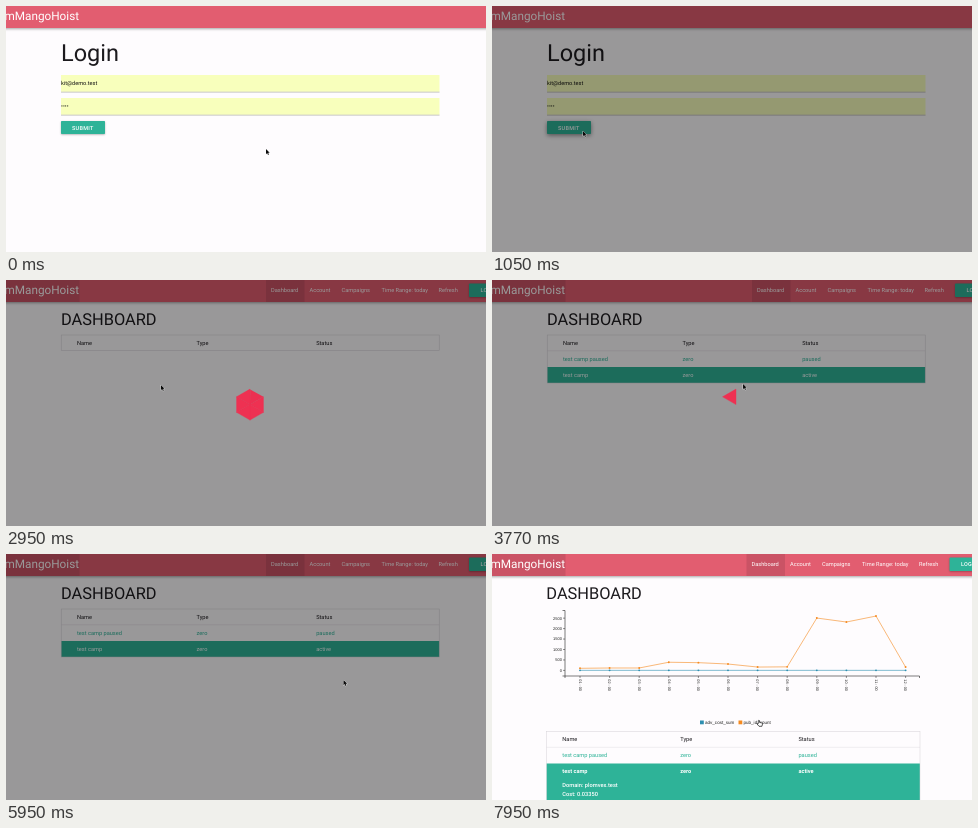
An HTML page with a canvas that plays this animation: 480x246 px, repeating every 8000 ms.

```html
<!DOCTYPE html>
<html lang="en">
<head>
<meta charset="utf-8">
<title>Dashboard login</title>
<style>
  html, body { margin: 0; width: 100%; height: 100%; overflow: hidden; background: #fefcfe; }
  canvas { display: block; width: 480px; height: 246px; }
</style>
</head>
<body>
<canvas id="stage"></canvas>
<script>
const W = 480, H = 246, LOOP = 8000;
const canvas = document.getElementById('stage');
const ctx = canvas.getContext('2d');
const dpr = window.devicePixelRatio || 1;
canvas.width = W * dpr;
canvas.height = H * dpr;

const SANS = 'Roboto, sans-serif';
const ARIAL = '"Liberation Sans", sans-serif';
const INK = '#1c1a1e', GREEN = '#2eb398', PINK = '#e25d70', PINK_ACTIVE = '#ca5365';
const BLUE = '#2e8fb0', ORANGE = '#f58a1f';

// Times of the hard changes and of the loader, in ms
const DIM = 900, ROUTE = 1500, SPIN = 1947, ROWS = 3600, SPIN_END = 5940, CHART = 6150;

// Pointer stops: time, x, y
const PATH = [
  [0, 260, 143], [100, 259, 143], [780, 91, 125], [1200, 91, 125],
  [2300, 154, 105], [3100, 155, 105], [4200, 300, 103.5], [4800, 301.5, 103.5],
  [5600, 337.5, 126], [5980, 337.5, 126], [6280, 330, 258], [6700, 320, 258],
  [7600, 265.5, 166], [8000, 265.5, 166]
];

function text(str, x, y, size, color = INK, weight = 400, family = SANS, align = 'left') {
  ctx.font = `${weight} ${size}px ${family}`;
  ctx.fillStyle = color;
  ctx.textAlign = align;
  ctx.fillText(str, x, y);
}

function box(x, y, w, h, color) {
  ctx.fillStyle = color;
  ctx.fillRect(x, y, w, h);
}

function line(points, color, width) {
  ctx.beginPath();
  points.forEach(([x, y]) => ctx.lineTo(x, y));
  ctx.strokeStyle = color;
  ctx.lineWidth = width;
  ctx.stroke();
}

function shadow(blur, y, alpha) {
  ctx.shadowBlur = blur * dpr;
  ctx.shadowOffsetY = y * dpr;
  ctx.shadowColor = `rgba(0,0,0,${alpha})`;
}

function button(label, x, y, w, h, textX, raised) {
  ctx.save();
  shadow(raised ? 4 : 2, raised ? 1.4 : 0.7, raised ? 0.45 : 0.3);
  ctx.fillStyle = GREEN;
  ctx.beginPath();
  ctx.roundRect(x, y, w, h, 0.8);
  ctx.fill();
  ctx.restore();
  ctx.letterSpacing = '0.25px';
  text(label, textX, y + h / 2 + 2, 5.5, '#fff', 500);
  ctx.letterSpacing = '0px';
}

function nav(signedIn, dx) {
  ctx.save();
  shadow(2.5, 0.8, 0.35);
  box(-5, -5, W + 10, 27, PINK);
  ctx.restore();
  if (signedIn) {
    box(0, 0, 73.5, 22, PINK_ACTIVE);
    box(260 + dx, 0, 38.5, 22, PINK_ACTIVE);
    const links = [['Dashboard', 265], ['Account', 303.5], ['Campaigns', 335.5],
      ['Time Range: today', 375.5], ['Refresh', 432.5]];
    links.forEach(([label, x]) => text(label, x + dx, 12, 5.65, '#fff'));
    button('LOGOUT', 463 + dx, 3.5, 46, 13.5, 474.5 + dx, false);
  }
  text('mMangoHoist', -1.5, 14, 11.75, '#fff');
}

function field(value, y) {
  box(55, y, 378.5, 16.8, '#f8ffbc');
  box(55, y + 16.8, 378.5, 0.6, '#a5a5a0');
  text(value, 55, y + 10.4, 5.6, '#111');
}

function login(t) {
  nav(false, 0);
  text('Login', 55, 55, 23.5);
  field('kit@demo.test', 69);
  field('••••', 92);
  button('SUBMIT', 55, 115, 44, 13, 66, t > 740);
}

function table(x, y, w, rows, details) {
  const cols = [15.8, 0.358 * w, 0.6745 * w];
  const row = (cells, base, color, weight) =>
    cells.forEach((cell, i) => text(cell, x + cols[i], base, 5.65, color, weight));
  const bottom = y + (rows ? 48 : 15.5);
  row(['Name', 'Type', 'Status'], y + 9.7);
  if (rows) {
    row(['test camp paused', 'zero', 'paused'], y + 25.8, GREEN);
    box(x, y + 32, w, details ? 60 : 16, GREEN);
    row(['test camp', 'zero', 'active'], y + 41.9, '#fff', details ? 700 : 400);
    line([[x, y + 15.8], [x + w, y + 15.8]], '#dedbe0', 0.5);
  }
  ctx.strokeStyle = '#d5d2d7';
  ctx.lineWidth = 0.5;
  ctx.strokeRect(x, y, w, details ? 100 : bottom - y);
  if (details) {
    ['Domain: plomvex.test', 'Cost: 0.03350', 'All hits: 120'].forEach((s, i) =>
      text(s, x + 15.8, y + 55.8 + i * 8.2, 5.7, '#fff', 500));
  }
}

function chart() {
  const px = i => 88 + i * 29.6;
  const py = v => 116.4 - v * 0.0209;
  line([[70.5, 56.5], [73, 56.5], [73, 122], [70.5, 122]], '#222', 0.6);
  line([[73, 124], [73, 122], [427.5, 122], [427.5, 124]], '#222', 0.6);
  for (let v = 0; v <= 2500; v += 500) {
    line([[71, py(v)], [73, py(v)]], '#222', 0.5);
    text(v, 70, py(v) + 1.4, 4, '#222', 400, ARIAL, 'right');
  }
  const hits = [100, 115, 115, 390, 370, 305, 160, 170, 2505, 2315, 2600, 160];
  const series = [[hits.map(() => 2), BLUE], [hits, ORANGE]];
  series.forEach(([values, color]) => {
    const pts = values.map((v, i) => [px(i), py(v)]);
    line(pts, color, 0.6);
    ctx.fillStyle = color;
    pts.forEach(([x, y]) => {
      ctx.beginPath();
      ctx.arc(x, y, 0.95, 0, 7);
      ctx.fill();
    });
  });
  for (let i = 0; i < 12; i++) {
    line([[px(i), 122], [px(i), 124]], '#222', 0.5);
    ctx.save();
    ctx.translate(px(i) - 1.2, 125.3);
    ctx.rotate(Math.PI / 2);
    text(`${String(i + 1).padStart(2, '0')} : 00`, 0, 0, 3.8, '#222', 400, ARIAL);
    ctx.restore();
  }
  [['adv_cost_sum', 208, BLUE], ['pub_id_count', 246.5, ORANGE]].forEach(([s, x, color]) => {
    box(x, 166.5, 3.8, 3.8, color);
    text(s, x + 5, 170, 4.55, '#222', 400, ARIAL);
  });
}

function dashboard(t) {
  const full = t >= CHART;
  nav(true, full ? -5.5 : 0);
  text('DASHBOARD', full ? 54.3 : 55, 45, 16.4);
  if (full) {
    chart();
    table(54.5, 177.5, 373.5, true, true);
  } else {
    table(55.2, 55, 378, t >= ROWS, false);
  }
}

// Six triangles unfold clockwise, then fold away in the same order
function loader(t) {
  const cx = 244, cy = 124.6, r = 15.5;
  const phase = (t - SPIN) % 2000 / 1000;
  const filling = phase < 1;
  const corner = k => {
    const a = (k * 60 - 90) * Math.PI / 180;
    return [r * Math.cos(a), r * Math.sin(a)];
  };
  for (let k = 0; k < 6; k++) {
    const p = Math.min(1, Math.max(0, phase % 1 * 6 - k));
    const open = filling ? p : 1 - p;
    if (open < 0.06) continue;
    const hinge = corner(filling ? k : k + 1);
    const tip = corner(filling ? k + 1 : k);
    const move = i => hinge[i] / 2 + (tip[i] - hinge[i] / 2) * open;
    ctx.beginPath();
    ctx.moveTo(cx, cy);
    ctx.lineTo(cx + hinge[0], cy + hinge[1]);
    ctx.lineTo(cx + move(0), cy + move(1));
    ctx.closePath();
    const shade = 0.45 + 0.55 * open;
    ctx.fillStyle = `rgb(${238 * shade},${49 * shade},${82 * shade})`;
    ctx.fill();
    if (open === 1) {
      ctx.strokeStyle = ctx.fillStyle;
      ctx.lineWidth = 0.4;
      ctx.stroke();
    }
  }
}

function pointerAt(t) {
  const i = Math.max(1, PATH.findIndex(p => p[0] > t));
  const [t0, x0, y0] = PATH[i - 1], [t1, x1, y1] = PATH[i];
  const u = (t - t0) / (t1 - t0);
  const e = u * u * (3 - 2 * u);
  return [x0 + (x1 - x0) * e, y0 + (y1 - y0) * e];
}

const ARROW = new Path2D('M0 0V5.2L1.2 4.1L2 6L2.9 5.6L2.1 3.8H3.7Z');
const HAND = new Path2D('M.8 .6Q1.4-.2 2 .6V2.4L4.6 3Q5.2 3.2 5 4L4.4 6.3H1.5L-.4 4Q-.5 3.1.8 3.6Z');

function pointer(t) {
  const [x, y] = pointerAt(t);
  const hand = t > 7500 || (t > 740 && t < DIM);
  ctx.save();
  ctx.translate(x, y);
  ctx.lineJoin = 'round';
  ctx.lineWidth = hand ? 0.7 : 0.8;
  ctx.strokeStyle = hand ? '#111' : 'rgba(255,255,255,.8)';
  ctx.fillStyle = hand ? '#fff' : '#0a0a0a';
  const shape = hand ? HAND : ARROW;
  if (hand) ctx.fill(shape);
  ctx.stroke(shape);
  if (!hand) ctx.fill(shape);
  ctx.restore();
}

function draw(now) {
  const t = now % LOOP;
  ctx.setTransform(dpr, 0, 0, dpr, 0, 0);
  ctx.textRendering = 'geometricPrecision';
  box(0, 0, W, H, '#fefcfe');
  if (t < ROUTE) login(t);
  else dashboard(t);
  if (t >= DIM && t < CHART) {
    box(0, 0, W, H, `rgba(0,0,0,${0.4 * Math.min(1, (t - DIM) / 120)})`);
    if (t >= SPIN && t < SPIN_END) loader(t);
  }
  pointer(t);
}

const start = performance.now();
function tick() {
  draw(performance.now() - start);
  requestAnimationFrame(tick);
}
tick();
</script>
</body>
</html>
```
